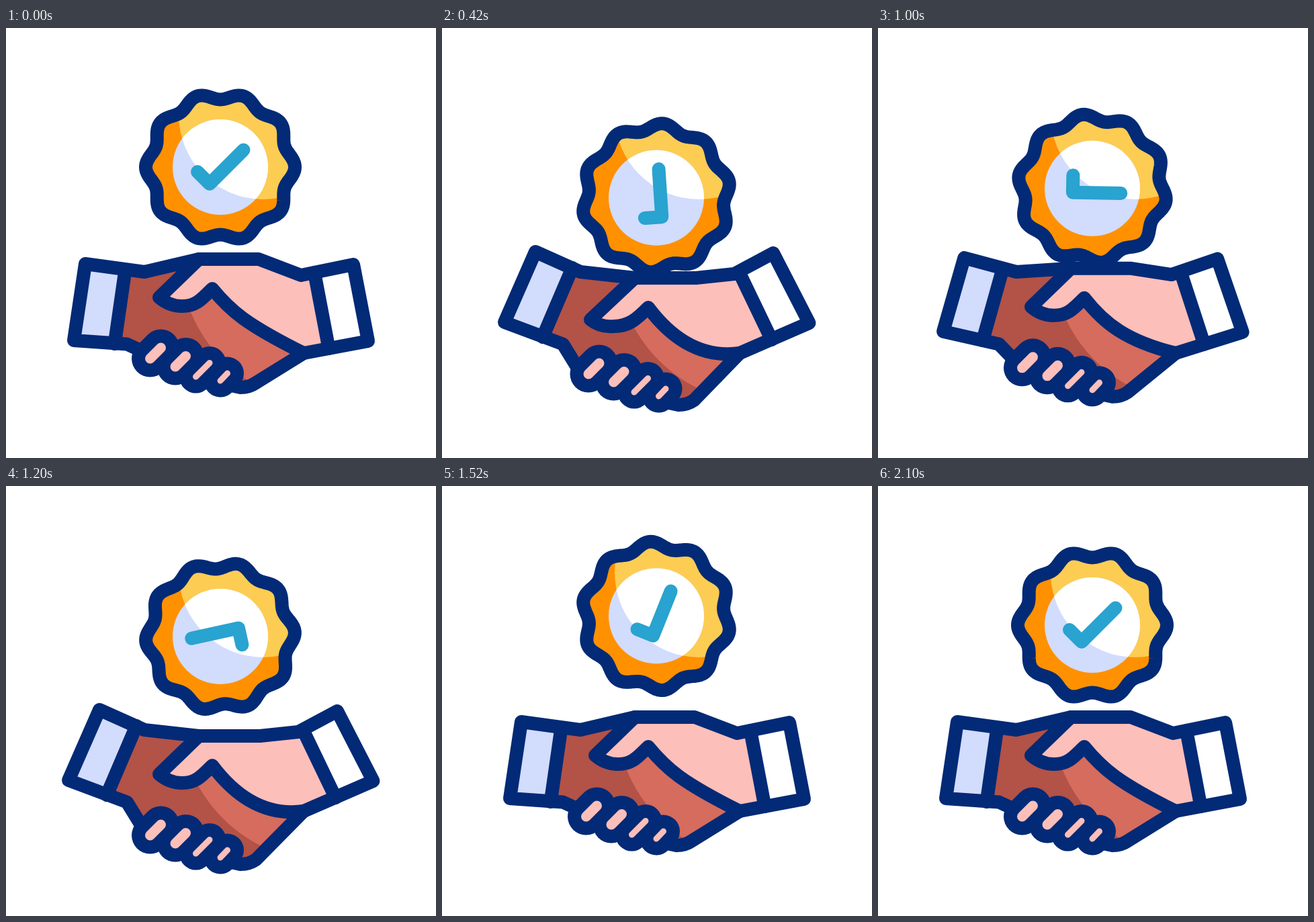
Animation, 640 px wide and 640 px high, one loop 2.4 s. Source, as an HTML page with a canvas:

```html
<!DOCTYPE html>
<html lang="en">
<head>
<meta charset="utf-8">
<title>Handshake</title>
<style>
  html, body { margin: 0; width: 100%; height: 100%; overflow: hidden; background: #fff; }
  canvas { display: block; width: 640px; height: 640px; }
</style>
</head>
<body>
<canvas id="stage" width="640" height="640"></canvas>
<script>
const ctx = document.getElementById('stage').getContext('2d');
const LOOP = 2400;
const NAVY = '#032a76', ORANGE = '#ff9100', YELLOW = '#fdcc53', LAVENDER = '#d2dcfd';
const TEAL = '#29a3cf', BROWN = '#b35247', TAN = '#d56c5d', PINK = '#fdbfba', WHITE = '#fff';
const LINE = 20;

// Tracks are [time, value] keys, eased in and out between neighbours.
const HEIGHT = [[0, 207], [400, 253.7], [733, 169.5], [1067, 246.7], [1400, 182.5],
                [1733, 219], [1900, 202], [2095, 207]];
const BEND = [[0, 0], [410, 1], [425, 1], [820, 0], [1185, 1], [1205, 1], [1500, 0]];
const SQUEEZE = [[0, 0], [410, 1], [425, 1], [820, 0]];
const WINDUP = [[0, 0], [390, -49]];
const SPIN = [[380, -49], [1900, 360]];

// Symmetric cubic ease; k is the handle length.
function ease(u, k) {
  let lo = 0, hi = 1, s = u;
  for (let i = 0; i < 24; i++) {
    s = (lo + hi) / 2;
    const r = 1 - s;
    const x = 3 * r * r * s * k + 3 * r * s * s * (1 - k) + s * s * s;
    if (x < u) lo = s; else hi = s;
  }
  return s * s * (3 - 2 * s);
}

function track(keys, t, k = 1 / 3) {
  if (t <= keys[0][0]) return keys[0][1];
  for (let i = 1; i < keys.length; i++) {
    const [t0, a] = keys[i - 1], [t1, b] = keys[i];
    if (t < t1) return a + (b - a) * ease((t - t0) / (t1 - t0), k);
  }
  return keys[keys.length - 1][1];
}

function poly(points, close) {
  const path = new Path2D();
  points.forEach(p => path.lineTo(...p));
  if (close) path.closePath();
  return path;
}

function disc(x, y, r) {
  const path = new Path2D();
  path.arc(x, y, r, 0, Math.PI * 2);
  return path;
}

function fill(path, color) {
  ctx.fillStyle = color;
  ctx.fill(path);
}

function stroke(path, color = NAVY, width = LINE) {
  ctx.strokeStyle = color;
  ctx.lineWidth = width;
  ctx.stroke(path);
}

// Fills a shape with a shade, lit where the light disc covers it.
function lit(path, shade, bright, light) {
  fill(path, shade);
  ctx.save();
  ctx.clip(path);
  fill(light, bright);
  ctx.restore();
}

function drawBadge(t) {
  const cx = 319, cy = track(HEIGHT, t);
  const deg = t < 380 ? track(WINDUP, t) : track(SPIN, t, 0.73);
  const rot = deg * Math.PI / 180;
  const rim = [];
  for (let i = 0; i < 360; i++) {
    const a = i * Math.PI / 180, r = 105.8 + 5.2 * Math.cos(10 * a);
    rim.push([cx + r * Math.cos(a + rot), cy + r * Math.sin(a + rot)]);
  }
  const seal = poly(rim, true);
  const light = disc(383, 129, 126);
  lit(seal, ORANGE, YELLOW, light);
  lit(disc(cx, cy, 71), LAVENDER, WHITE, light);
  stroke(seal);

  ctx.save();
  ctx.translate(cx, cy);
  ctx.rotate(rot);
  stroke(poly([[-34, 7], [-16, 25], [34.5, -25.5]]), TEAL);
  ctx.restore();
}

function drawHands(t) {
  const bend = track(BEND, t), squeeze = track(SQUEEZE, t), drop = 28 * bend;
  const mix = (ax, ay, bx, by) => [ax + (bx - ax) * bend, ay + (by - ay) * bend];
  const down = (x, y, sx = 0, sy = 0) => [x + sx * squeeze, y + drop + sy * squeeze];

  const leftTop = mix(118, 351, 139, 333), leftLow = mix(101, 465, 93, 438);
  const leftSeam = [mix(177.5, 360, 194, 357), mix(161.7, 470, 150, 460)];
  const rightTop = mix(517, 352, 493, 335), rightLow = mix(539, 466, 546.5, 439);
  const rightSeam = [mix(459, 364, 442, 363), mix(480.5, 477, 490.5, 464)];
  const wristL = [206, 363], wristR = mix(439, 368, 435, 366);
  const heelL = [180, 470.5], heelR = [443, 484];
  const backL = down(287, 344), backR = mix(376, 344, 378, 372);

  // Lower edge of the palm.
  const palm = path => {
    path.lineTo(...heelR);
    path.lineTo(...down(372, 528, 3, -2));
    path.quadraticCurveTo(...down(362, 535, 3, -2), ...down(349, 535, 3, -2));
    path.lineTo(...down(335, 532, 3, -2));
  };

  const knuckle = down(307, 388);
  const thumb = path => {
    path.moveTo(...backL);
    path.lineTo(...down(228, 401, -7, 5));
    path.quadraticCurveTo(...down(243, 414, -7, 4), ...down(262, 414, -6, 2));
    path.bezierCurveTo(...down(282, 414, -4, 2), ...down(290, 405), ...knuckle);
    path.bezierCurveTo(...mix(334, 421, 340, 460), ...mix(357, 441, 384, 492), ...heelR);
  };

  const body = poly([heelL, leftSeam[1], leftSeam[0], wristL, backL, backR,
                     wristR, rightSeam[0], rightSeam[1]]);
  palm(body);
  body.lineTo(...down(215, 492));
  body.closePath();
  lit(body, BROWN, TAN, disc(478, 339.5, 219.5));

  const pink = new Path2D();
  thumb(pink);
  [rightSeam[1], rightSeam[0], wristR, backR].forEach(p => pink.lineTo(...p));
  pink.closePath();
  fill(pink, PINK);

  fill(poly([leftTop, leftSeam[0], leftSeam[1], leftLow], true), LAVENDER);
  fill(poly([rightTop, rightSeam[0], rightSeam[1], rightLow], true), WHITE);

  stroke(poly([down(204, 481.5), heelL, leftLow, leftTop, wristL, backL,
               backR, wristR, rightTop, rightLow, heelR]));
  stroke(poly(leftSeam));
  stroke(poly(rightSeam));
  const edge = new Path2D();
  palm(edge);
  stroke(edge);
  const crease = new Path2D();
  thumb(crease);
  stroke(crease);

  const fingers = [
    [230.5, 476, 214.5, 492, 15],
    [267.5, 488.5, 252, 504, 15],
    [303, 498.5, 282.5, 519, 9],
    [329.5, 514, 319, 525, 9]
  ].map(([x0, y0, x1, y1, w]) =>
    [poly([down(x0, y0, 3.5, -5), down(x1, y1, 3.5, -5)]), w]);
  fingers.forEach(([path, w]) => stroke(path, NAVY, w + 2 * LINE));
  fingers.forEach(([path, w]) => stroke(path, PINK, w));
}

function frame() {
  const t = performance.now() % LOOP;
  fill(poly([[0, 0], [640, 0], [640, 640], [0, 640]], true), WHITE);
  drawBadge(t);
  drawHands(t);
  requestAnimationFrame(frame);
}

ctx.lineCap = ctx.lineJoin = 'round';
frame();
</script>
</body>
</html>
```
